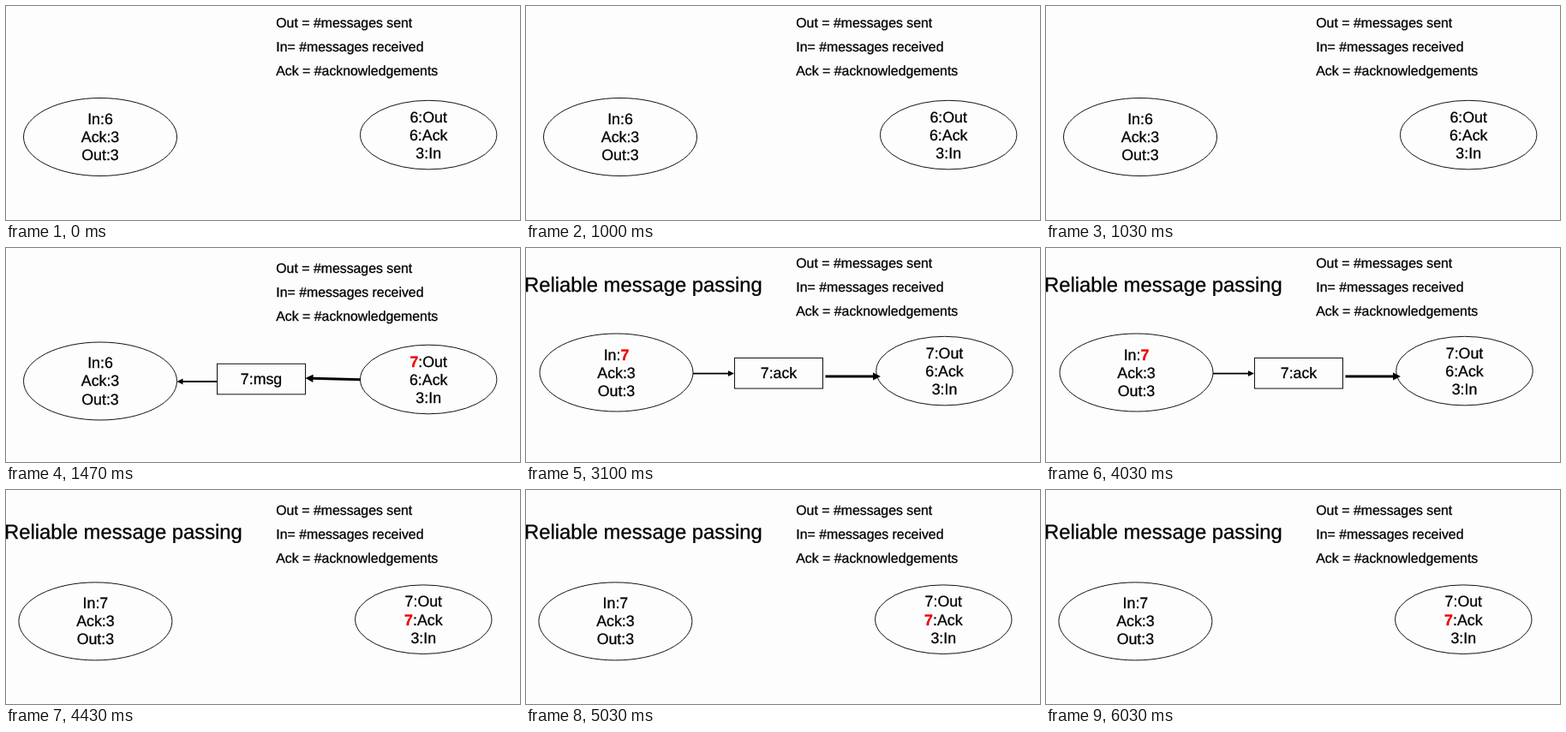
Animation of 600x250 px, one loop 6910 ms. Source, as an HTML page:

```html
<!DOCTYPE html>
<html lang="en">
<head>
<meta charset="utf-8">
<title>Reliable message passing</title>
<style>
  html, body { margin: 0; height: 100%; overflow: hidden; background: #fefdfe; }
  svg { display: block; width: 600px; height: 250px; }
  text {
    font-family: "Liberation Sans", Arial, sans-serif;
    font-size: 17.8px;
    text-anchor: middle;
    text-rendering: geometricPrecision;
    stroke: #000;
    stroke-width: .3;
  }
  .legend text { font-size: 15.85px; text-anchor: start; }
  text.title { font-size: 23.8px; text-anchor: start; }
  .new { fill: #f00000; stroke: #f00000; font-weight: bold; }
  .shape { fill: none; stroke: #111; stroke-width: 1; }
  .thin { stroke: #000; stroke-width: 1.9; }
  .thick { stroke: #000; stroke-width: 3; }

  .scene { opacity: 0; animation: 6910ms step-end infinite; }
  #idle { animation-name: idle; }
  #send { animation-name: send; }
  #reply { animation-name: reply; }
  #done { animation-name: done; }
  @keyframes idle { 0% { opacity: 1; } 21.2735%, 100% { opacity: 0; } }
  @keyframes send { 0% { opacity: 0; } 21.2735% { opacity: 1; } 44.8625%, 100% { opacity: 0; } }
  @keyframes reply { 0% { opacity: 0; } 44.8625% { opacity: 1; } 64.11%, 100% { opacity: 0; } }
  @keyframes done { 0% { opacity: 0; } 64.11%, 100% { opacity: 1; } }
</style>
</head>
<body>
<svg viewBox="0 0 600 250">
  <defs>
    <g id="legend" class="legend">
      <text x="315.3" y="24.6">Out = #messages sent</text>
      <text x="315.3" y="52.8">In= #messages received</text>
      <text x="315.3" y="81">Ack = #acknowledgements</text>
    </g>
    <ellipse id="receiver" class="shape" rx="89.5" ry="45.5"/>
    <ellipse id="sender" class="shape" rx="79.7" ry="40.3"/>
    <rect id="packet" class="shape" x="-51.5" y="-17.5" width="103" height="35.6"/>
    <path id="head" d="M0 0L-7 -3.4V3.4Z"/>
    <path id="bighead" d="M0 0L-9 -4.6V4.6Z"/>
  </defs>

  <g id="idle" class="scene">
    <use href="#legend"/>
    <g transform="translate(110 153)">
      <use href="#receiver"/>
      <text y="-15.5">In:6</text>
      <text y="5.8">Ack:3</text>
      <text y="27.1">Out:3</text>
    </g>
    <g transform="translate(493.2 150.6)">
      <use href="#sender"/>
      <text y="-15">6:Out</text>
      <text y="6.3">6:Ack</text>
      <text y="27.6">3:In</text>
    </g>
  </g>

  <g id="send" class="scene">
    <use href="#legend" y="4.2"/>
    <g transform="translate(110 155.5)">
      <use href="#receiver"/>
      <text y="-15.5">In:6</text>
      <text y="5.8">Ack:3</text>
      <text y="27.1">Out:3</text>
    </g>
    <g transform="translate(298 152.8)">
      <use href="#packet"/>
      <text y="6.2">7:msg</text>
    </g>
    <g transform="translate(493.2 153.5)">
      <use href="#sender"/>
      <text y="-15"><tspan class="new">7</tspan>:Out</text>
      <text y="6.3">6:Ack</text>
      <text y="27.6">3:In</text>
    </g>
    <path class="thin" d="M247 156H205"/>
    <use href="#head" transform="translate(199.5 156) rotate(180)"/>
    <path class="thick" d="M414 153.8L357 152.2"/>
    <use href="#bighead" transform="translate(349.5 152) rotate(181.8)"/>
  </g>

  <g id="reply" class="scene">
    <use href="#legend" y="-1.7"/>
    <text class="title" x="-2" y="51.4">Reliable message passing</text>
    <g transform="translate(105.5 145.5)">
      <use href="#receiver"/>
      <text y="-15">In:<tspan class="new">7</tspan></text>
      <text y="6.3">Ack:3</text>
      <text y="27.6">Out:3</text>
    </g>
    <g transform="translate(295 146)">
      <use href="#packet"/>
      <text y="6.4">7:ack</text>
    </g>
    <g transform="translate(488.5 143.6)">
      <use href="#sender"/>
      <text y="-15">7:Out</text>
      <text y="6.3">6:Ack</text>
      <text y="27.6">3:In</text>
    </g>
    <path class="thin" d="M195 146.6H237"/>
    <use href="#head" transform="translate(243 146.6)"/>
    <path class="thick" d="M349.5 150H406"/>
    <use href="#bighead" transform="translate(414 150)"/>
  </g>

  <g id="done" class="scene">
    <use href="#legend" y="4.2"/>
    <text class="title" x="-2" y="57.2">Reliable message passing</text>
    <g transform="translate(104.4 153.4)">
      <use href="#receiver"/>
      <text y="-15.5">In:7</text>
      <text y="5.8">Ack:3</text>
      <text y="27.1">Out:3</text>
    </g>
    <g transform="translate(487.3 151.2)">
      <use href="#sender"/>
      <text y="-15">7:Out</text>
      <text y="6.3"><tspan class="new">7</tspan>:Ack</text>
      <text y="27.6">3:In</text>
    </g>
  </g>
</svg>
</body>
</html>
```
